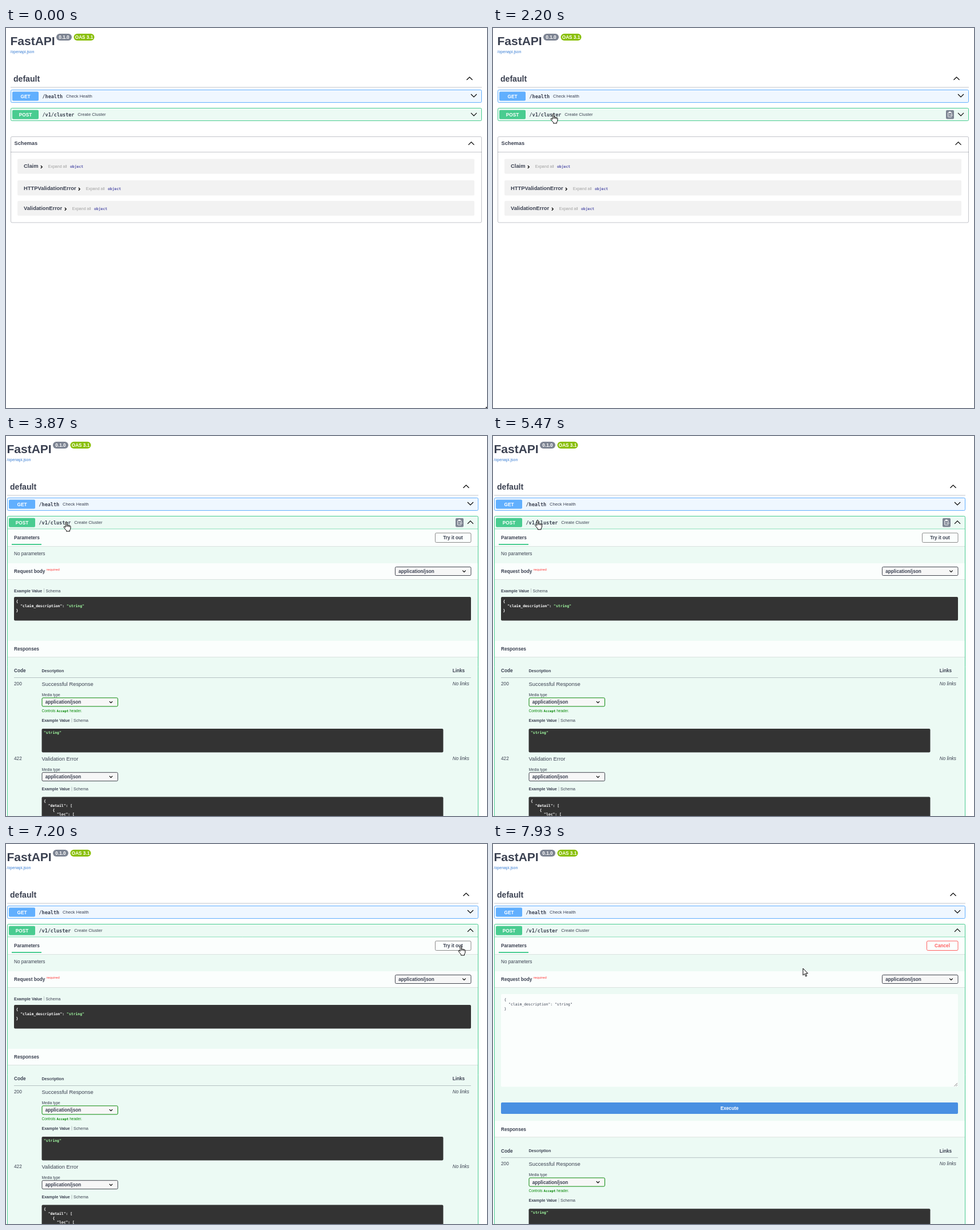
An HTML page with a canvas that plays this animation: 841 px wide and 666 px high, repeating every 8 s.

```html
<!DOCTYPE html>
<html lang="en">
<head>
<meta charset="utf-8">
<title>API docs</title>
<style>
html, body { margin: 0; width: 100%; height: 100%; overflow: hidden; background: #fff; }
canvas { display: block; }
</style>
</head>
<body>
<canvas id="stage" width="841" height="666"></canvas>
<script>
const ctx = document.getElementById('stage').getContext('2d');
const LOOP = 8000, FPS = 15;
const SANS = '"Liberation Sans", Arial, sans-serif';
const MONO = '"DejaVu Sans Mono", monospace';
const INK = '#3b4151', GREEN = '#49cc90', BLUE = '#61affe', MINT = '#ecfaf4';
const RULE = 'rgba(59,65,81,.3)', PALE = 'rgba(255,255,255,.8)';

// Steps at which the page changes
const OPEN = 58, EDIT = 111;

// Pointer moves: first step, last step, start, control, end
const MOVES = [
  [7, 15, [839.5, 664], [330, 378], [158, 484]],
  [17, 30, [158, 484], [-90, 250], [105.5, 150]],
  [81, 83, [105.5, 150], [70, 146], [67, 145.5]],
  [84, 89, [67, 145.5], [130, 137], [208, 143]],
  [90, 103, [208, 143], [560, 245], [796, 184]],
  [103, 108, [796, 184], [796, 180], [795.5, 178]],
  [111, 119, [795.5, 178], [670, 190], [542, 218]]
];

const HAND = new Path2D('M3.6 10.6V1.8Q4.8-.3 6 1.8V7Q7.2 5.4 8.3 7.2Q9.4 6.1 10.4 7.8Q11.8 7 12.4 9V12.5Q12 14.5 11 15.6V17.5H5V16L.9 11Q0 9.4 1.4 9.2Q2.6 9.4 3.6 10.6Z');
const FINGERS = new Path2D('M6 6.5V9.5M8.3 7.2V9.7M10.4 7.8V10');
const ARROW = new Path2D('M.5 .5V12.6L3.3 10L5.3 14.5L7.2 13.7L5.2 9.3H9Z');

const clamp = v => Math.min(1, Math.max(0, v));

function text(str, x, y, size, { color = INK, style = 'bold', font = SANS, align = 'left' } = {}) {
  ctx.font = `${style} ${size}px ${font}`;
  ctx.fillStyle = color;
  ctx.textAlign = align;
  ctx.fillText(str, x, y);
}

function fill(x0, y0, x1, y1, color, r = 0) {
  ctx.fillStyle = color;
  ctx.beginPath();
  ctx.roundRect(x0, y0, x1 - x0, y1 - y0, r);
  ctx.fill();
}

function frame(x0, y0, x1, y1, color, r = 2, w = 1) {
  ctx.strokeStyle = color;
  ctx.lineWidth = w;
  ctx.beginPath();
  ctx.roundRect(x0, y0, x1 - x0, y1 - y0, r);
  ctx.stroke();
}

function line(x0, y0, x1, y1, color, w = 1) {
  ctx.strokeStyle = color;
  ctx.lineWidth = w;
  ctx.beginPath();
  ctx.moveTo(x0, y0);
  ctx.lineTo(x1, y1);
  ctx.stroke();
}

function chevron(x, y, turn = 0, size = 5, w = 1.2) {
  ctx.save();
  ctx.translate(x, y);
  ctx.rotate(turn * Math.PI / 2);
  ctx.strokeStyle = '#000';
  ctx.lineWidth = w;
  ctx.beginPath();
  ctx.moveTo(-size, -size / 2);
  ctx.lineTo(0, size / 2);
  ctx.lineTo(size, -size / 2);
  ctx.stroke();
  ctx.restore();
}

function copyIcon(alpha) {
  if (alpha <= 0) return;
  ctx.save();
  ctx.globalAlpha = alpha;
  fill(792, 144, 806, 159.5, '#7d8492', 2);
  frame(795.5, 148, 802, 156, '#fff', 1, 0.9);
  fill(797, 146.5, 800.5, 149, '#fff', 0.5);
  fill(799.5, 151, 804, 154.5, '#7d8492');
  line(800, 152.7, 804, 152.7, '#fff', 0.9);
  line(800, 152.7, 801.6, 151.2, '#fff', 0.9);
  line(800, 152.7, 801.6, 154.2, '#fff', 0.9);
  line(797, 151.3, 799, 151.3, '#fff', 0.8);
  line(797, 153.7, 798.5, 153.7, '#fff', 0.8);
  ctx.restore();
}

function operation(y, verb, path, note, noteX, color) {
  fill(11, y + 3.5, 57, y + 19.5, color, 2);
  text(verb, 34, y + 14.5, 8.22, { color: '#fff', align: 'center' });
  text(path, 63.5, y + 14.5, 8.45, { font: MONO });
  text(note, noteX, y + 14, 7.63, { style: 'normal' });
}

function header(open, iconAlpha) {
  text('FastAPI', 7.5, 29.8, 21);
  fill(88, 10, 115, 22, '#7d8492', 6);
  text('0.1.0', 101.5, 19, 8.22, { color: '#fff', align: 'center' });
  fill(118.5, 10, 154.5, 22, '#89bf04', 6);
  text('OAS 3.1', 136.5, 19, 8.22, { color: '#fff', align: 'center' });
  text('/openapi.json', 7.5, 44, 7.04, { style: 'normal', color: '#3b7fd4' });
  text('default', 13, 94, 14.08);
  line(8, 104, 832, 104, RULE);
  chevron(810.5, 88.5, 2);

  fill(8, 108, 832, 131, '#eff7ff', 2);
  frame(8.5, 108.5, 831.5, 130.5, BLUE);
  operation(108, 'GET', '/health', 'Check Health', 105, BLUE);
  chevron(818, 118.5);

  const bottom = open ? 690 : 162.5;
  fill(8, 140, 832, bottom + 0.5, MINT, 2);
  frame(8.5, 140.5, 831.5, bottom, GREEN);
  operation(140.3, 'POST', '/v1/cluster', 'Create Cluster', 125.3, GREEN);
  chevron(818, 151.3, open ? 2 : 0);
  copyIcon(iconAlpha);
}

function schema(y0, y1, name, chevX, base) {
  fill(20, y0, 819, y1, '#f2f2f2', 2);
  text(name, 31, base, 9.39);
  chevron(chevX, base - 1.3, 3, 2.4, 1.3);
  text('Expand all', chevX + 11.7, base, 7.04, { style: 'normal', color: '#a0a0a0' });
  text('object', chevX + 50, base, 6.4, { font: MONO, color: '#55a' });
}

function schemas() {
  frame(8.5, 190.5, 831.5, 341, RULE);
  text('Schemas', 14.5, 205.3, 9.25);
  line(8, 217.5, 832, 217.5, RULE);
  chevron(813.5, 202.3, 2);
  schema(229.5, 255.5, 'Claim', 62, 244.8);
  schema(267, 293.5, 'HTTPValidationError', 128, 283.6);
  schema(303, 329, 'ValidationError', 104, 318.6);
}

function band(y0, y1) {
  fill(3, y0, 825, y1, PALE);
  line(3, y1, 825, y1, 'rgba(0,0,0,.1)');
}

function select(x, y, color) {
  fill(x, y, x + 133, y + 15.5, '#f7f7f7', 2);
  frame(x + 0.5, y + 0.5, x + 133, y + 15.5, color);
  text('application/json', x + 6.2, y + 11, 8.22);
  chevron(x + 121, y + 8, 0, 2.7, 1.2);
}

function tabs(x, y) {
  text('Example Value', x, y, 7.04);
  line(x + 52.5, y - 6.5, x + 52.5, y + 1, RULE);
  text('Schema', x + 55.6, y, 7.04, { style: 'normal' });
}

function button(x0, label, color, border) {
  frame(x0 + 0.5, 170, 813, 186.5, border);
  text(label, (x0 + 813) / 2, 181.2, 8.22, { color, align: 'center' });
}

function code(str, x, y, color = '#fff', style = 'bold') {
  text(str, x, y, 6.4, { font: MONO, color, style });
}

function responseRow(y, status, title, color) {
  text(status, 14, y, 8.22, { style: 'normal' });
  text(title, 62.5, y + 0.6, 9.39, { style: 'normal' });
  text('No links', 780.7, y, 8.22, { style: 'italic' });
  text('Media type', 62.5, y + 18.5, 6.6, { style: 'normal' });
  select(62.5, y + 21.2, color);
}

function responses() {
  band(359, 387.5);
  text('Responses', 14, 376.3, 8.22);
  text('Code', 14, 414.3, 8.22);
  text('Description', 62.5, 413.8, 7.04);
  text('Links', 780.7, 414.3, 8.22);
  line(14, 423.5, 813, 423.5, RULE);

  responseRow(437.2, '200', 'Successful Response', '#0a8a0a');
  const green = { style: 'normal', color: '#0a8a0a' };
  text('Controls', 62.5, 483.5, 6.46, green);
  text('Accept', 88.5, 483.5, 5.85, { font: MONO, color: '#0a8a0a' });
  text('header.', 111.2, 483.5, 6.46, green);
  tabs(62.5, 501);
  fill(62.5, 513, 764.5, 554.5, '#333', 2);
  code('"string"', 66, 522, '#a2fca2');

  responseRow(568, '422', 'Validation Error', '#41444e');
  tabs(62.5, 621.3);
  fill(62.5, 632.5, 764.5, 800, '#333', 2);
  ['{', '"detail": [', '{', '"loc": ['].forEach((s, i) => code(s, 66 + i * 7.7, 642 + i * 7.8));
}

function body(editing) {
  line(2, 163, 825, 163, 'rgba(73,204,144,.75)');
  band(163.5, 193.5);
  text('Parameters', 14, 181.2, 8.22);
  fill(10, 189, 62, 191, GREEN);
  text('No parameters', 14, 209.2, 8.22, { style: 'normal' });
  band(223, 251.5);
  text('Request body', 14, 240.2, 8.22);
  text('required', 70.7, 236, 6.25, { style: 'normal', color: '#ff3b3b' });
  select(680, 229, '#41444e');

  if (editing) {
    button(758, 'Cancel', '#ff6060', '#ff6060');
    fill(14, 263, 813, 425.5, PALE, 2);
    code('{', 19.5, 275, INK, 'normal');
    code('"claim_description": "string"', 27.2, 283, INK, 'normal');
    code('}', 19.5, 291.3, INK, 'normal');
    line(806.5, 424.5, 812, 419, '#777', 0.9);
    line(809.5, 424.5, 812, 422, '#777', 0.9);
    fill(14, 453, 813, 473, '#4990e2', 2);
    text('Execute', 413.5, 466.2, 8.22, { color: '#fff', align: 'center' });
  } else {
    button(750, 'Try it out', INK, '#8a8a8a');
    tabs(14, 273.5);
    fill(14, 282, 813, 323.5, '#333', 2);
    code('{', 17.5, 292);
    code('"claim_description":', 25.2, 299.7);
    code('"string"', 25.2 + 21 * 3.853, 299.7, '#a2fca2');
    code('}', 17.5, 307.7);
  }

  ctx.save();
  if (editing) ctx.translate(0, 126.2);
  responses();
  ctx.restore();
}

function pointerAt(step) {
  let pos = MOVES[0][2];
  for (const [from, to, a, c, b] of MOVES) {
    if (step < from) break;
    const p = clamp((step - from) / (to - from));
    const u = p * p * (3 - 2 * p), v = 1 - u;
    pos = a.map((_, i) => v * v * a[i] + 2 * u * v * c[i] + u * u * b[i]);
  }
  return pos;
}

function pointer(step) {
  const [x, y] = pointerAt(step);
  const left = step >= EDIT ? 758 : 750;
  const onRow = y > 140 && y < 163;
  const onButton = step >= OPEN && x > left && x < 813 && y > 170 && y < 187;
  const hand = onRow || onButton;
  ctx.save();
  ctx.translate(hand ? x - 5 : x - 0.5, y - 0.5);
  ctx.fillStyle = '#fff';
  ctx.strokeStyle = '#000';
  ctx.lineWidth = 1;
  ctx.fill(hand ? HAND : ARROW);
  ctx.stroke(hand ? HAND : ARROW);
  if (hand) ctx.stroke(FINGERS);
  ctx.restore();
}

function draw(time) {
  const step = Math.floor((time % LOOP + 4) * FPS / 1000) % (LOOP * FPS / 1000);
  const open = step >= OPEN;
  const iconAlpha = Math.min(clamp((step - 28) / 5), clamp((89 - step) / 5));

  ctx.fillStyle = '#fff';
  ctx.fillRect(0, 0, 841, 666);
  ctx.save();
  if (open) ctx.translate(-6, 0);
  header(open, iconAlpha);
  ctx.restore();
  if (open) body(step >= EDIT);
  else schemas();
  pointer(step);
}

const start = performance.now();
function tick() {
  draw(performance.now() - start);
  requestAnimationFrame(tick);
}
tick();
</script>
</body>
</html>
```
